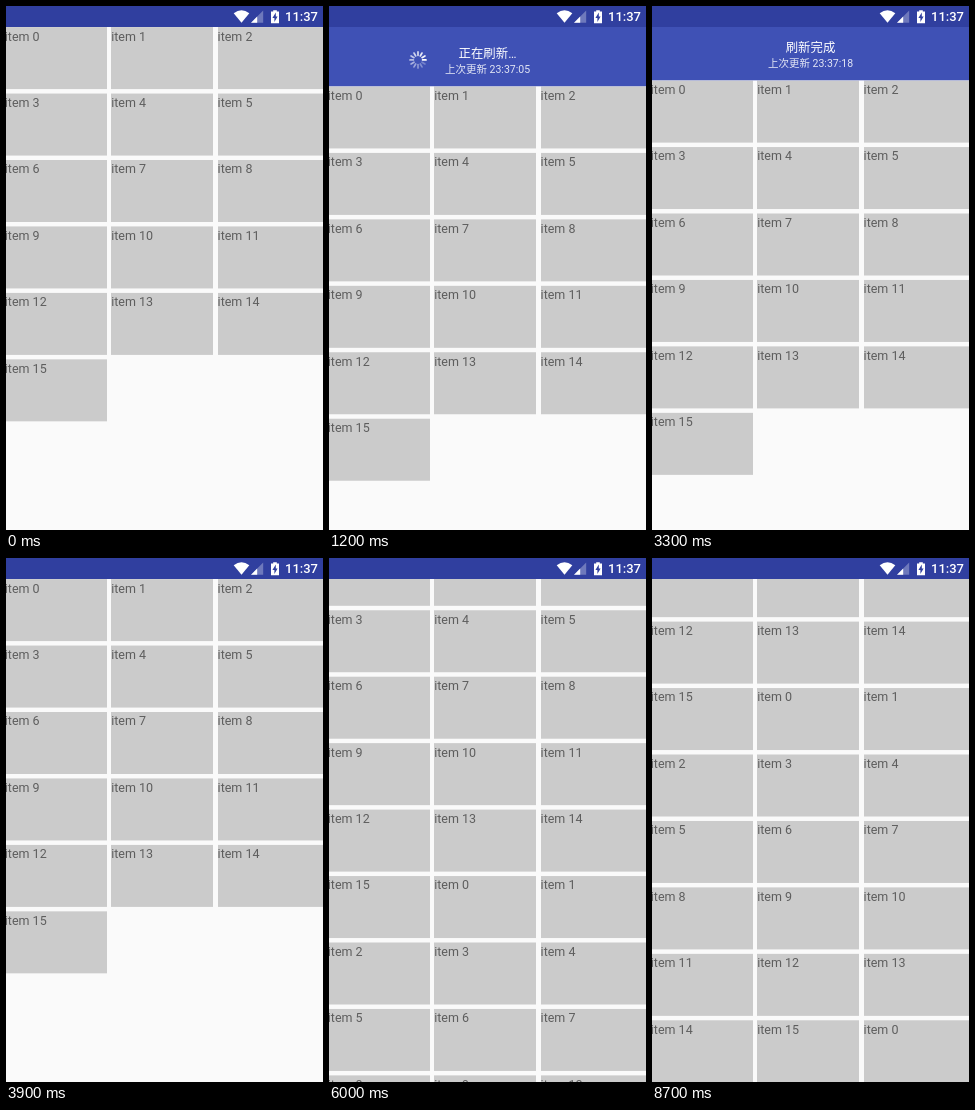
Recreate the animation shown at these times as an HTML page with a canvas. Size 317x524 px, loop 9200 ms.

```html
<!DOCTYPE html>
<html lang="zh-CN">
<head>
<meta charset="utf-8">
<style>
html, body { margin: 0; width: 317px; height: 524px; overflow: hidden; background: #fafafa; }
canvas { display: block; }
</style>
</head>
<body>
<canvas width="317" height="524"></canvas>
<script>
const W = 317, H = 524, BAR = 21.1, LOOP = 9200, STEP = 100;
const ROW = 66.45, CELL = 62, COL = 106.4;
const HEADER = 53.5, FOOTER = 35.3, PULL = 73.3;
const REFRESHED = 3300, LOADED = 6000, RELOADED = 8500;
const FONT = 'Roboto, "Noto Sans CJK SC", "Noto Sans CJK", sans-serif';
const ctx = document.querySelector('canvas').getContext('2d');

const clamp = p => Math.min(1, Math.max(0, p));
const smooth = p => (1 - Math.cos(p * Math.PI)) / 2;
const easeOut = p => 1 - (1 - p) ** 3;

// List position: the sum of every gesture and settling move made so far
function offsetAt(t) {
  const move = (from, to, dist, ease) => dist * ease(clamp((t - from) / (to - from)));
  return move(700, 1100, PULL, smooth)
    + move(1100, 1400, HEADER - PULL, easeOut)
    + move(3600, 3900, -HEADER, smooth)
    + move(4000, 4300, -FOOTER - 1, smooth)
    + move(4300, 4400, 1, smooth)
    + move(6400, 7100, -223.3, smooth)
    + move(8400, 8700, FOOTER, easeOut);
}

function rect(x, y, w, h, color) {
  ctx.fillStyle = color;
  ctx.fillRect(x, y, w, h);
}

function text(str, x, y, size, color, align = 'left', weight = 400) {
  ctx.font = `${weight} ${size}px ${FONT}`;
  ctx.textAlign = align;
  ctx.fillStyle = color;
  ctx.fillText(str, x, y);
}

function shape(path, color) {
  ctx.fillStyle = color;
  ctx.fill(new Path2D(path));
}

function drawList(off, count) {
  for (let i = 0; i < count; i++) {
    const col = i % 3;
    const x = col * COL - 1.2;
    const y = BAR + Math.floor(i / 3) * ROW + off;
    rect(Math.round(x), y, col < 2 ? 102 : 106, CELL, '#cbcbcb');
    text('item ' + i % 16, x, y + 13.4, 12.5, '#5e5e5e');
  }
}

function drawSpinner(x, y, t) {
  const head = (t - 1200) / STEP;
  ctx.lineWidth = 1.7;
  ctx.lineCap = 'round';
  for (let i = 0; i < 12; i++) {
    const age = (((head - i) % 12) + 12) % 12;
    const c = Math.cos(i * Math.PI / 6), s = Math.sin(i * Math.PI / 6);
    ctx.strokeStyle = `rgba(255,255,255,${1 - age * 0.065})`;
    ctx.beginPath();
    ctx.moveTo(x + c * 4.6, y + s * 4.6);
    ctx.lineTo(x + c * 8, y + s * 8);
    ctx.stroke();
  }
}

function drawHeader(off, t) {
  const bottom = BAR + off, done = t >= REFRESHED;
  ctx.save();
  ctx.beginPath();
  ctx.rect(0, 0, W, bottom);
  ctx.clip();
  rect(0, 0, W, bottom, '#3f51b5');
  text(done ? '刷新完成' : '正在刷新…', 158.5, bottom - 28.8, 12.4, '#fff', 'center');
  text('上次更新 23:37:' + (done ? '18' : '05'), 158.5, bottom - 13.8, 10.5, '#e3e6f5', 'center');
  if (!done) drawSpinner(89, bottom - 26.5, t);
  ctx.restore();
}

// Three balls shrinking and growing one after another
function drawDots(y, age) {
  for (let i = 0; i < 3; i++) {
    const p = Math.max(0, age - 120 * (i + 1)) % 750 / 750;
    const scale = 0.3 + 0.7 * Math.abs(1 - 2 * smooth(p));
    ctx.fillStyle = '#3f51b5';
    ctx.beginPath();
    ctx.arc(145.6 + 13 * i, y, 4.7 * scale, 0, 7);
    ctx.fill();
  }
}

function drawStatusBar() {
  rect(0, 0, W, 21, '#303f9f');
  shape('M235.5 16.8L227.7 7.2Q235.5 1.4 243.3 7.2Z', '#fff');
  shape('M257.2 4.6V16.8H245Z', 'rgba(255,255,255,.3)');
  shape('M251.2 10.6V16.8H245Z', '#fff');
  shape('M265 5.4H267.2V4.2H270.8V5.4H273V17.2H265Z', '#fff');
  shape('M269.8 6.6L266.4 12H268.4V16L271.6 10.4H269.8Z', '#303f9f');
  text('11:37', 279, 15.1, 13, '#fff', 'left', 500);
}

function draw(now) {
  const t = Math.floor(now % LOOP / STEP) * STEP;
  const off = offsetAt(t);
  const count = t >= RELOADED ? 48 : t >= LOADED ? 32 : 16;
  rect(0, 0, W, H, '#fafafa');
  drawList(off, count);
  if (off > 0.01) drawHeader(off, t);
  if (t >= 4250 && t < LOADED) drawDots(506.2, t - 4250);
  if (t >= 6545 && t < RELOADED) drawDots(off + 765.3, t - 6545);
  drawStatusBar();
}

const start = performance.now();
(function frame() {
  draw(performance.now() - start);
  requestAnimationFrame(frame);
})();
</script>
</body>
</html>
```
